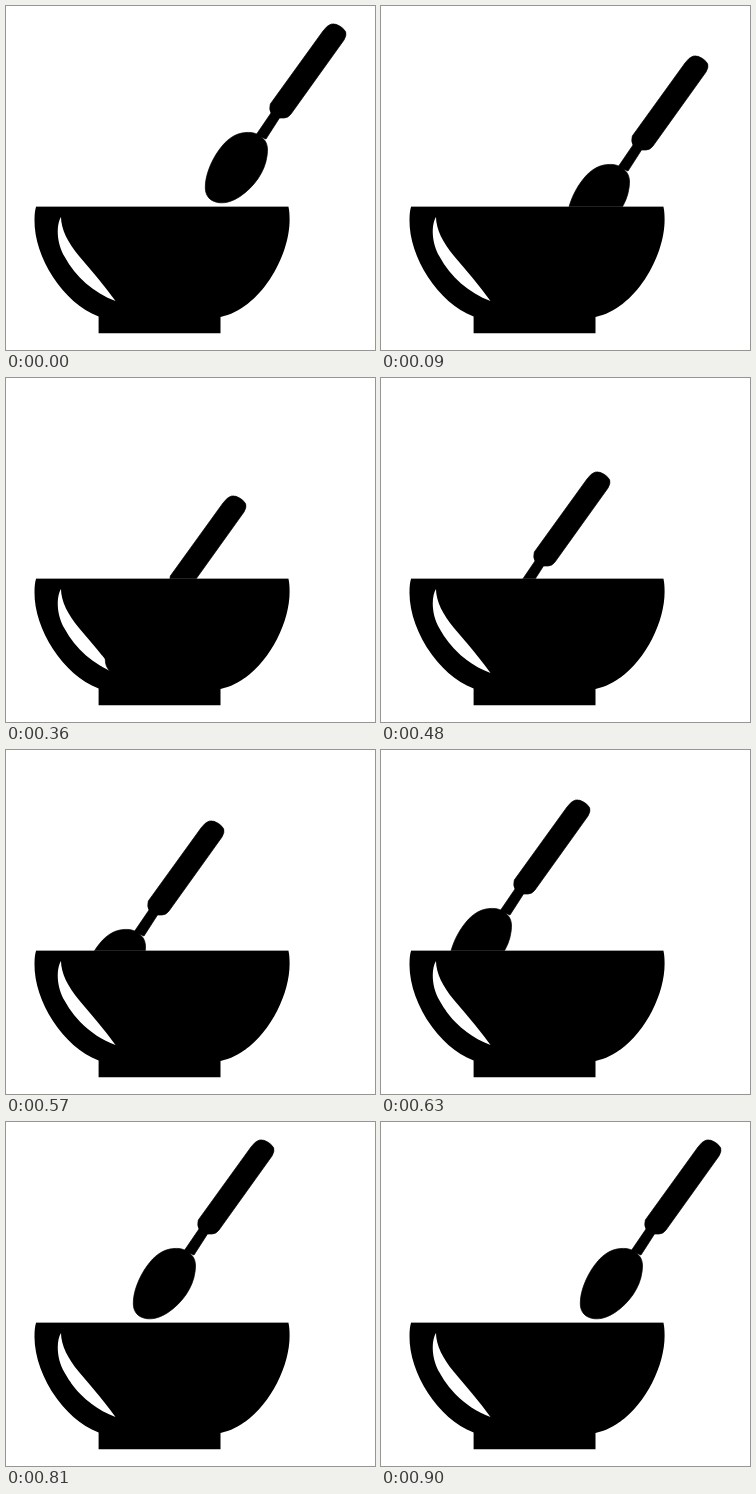
Write an HTML page that moves like this. It is 369 px wide and 344 px high and loops after 930 ms.

```html
<!DOCTYPE html>
<html lang="en">
<head>
<meta charset="utf-8">
<title>Stirring spoon</title>
<style>
html, body { margin: 0; width: 100%; height: 100%; overflow: hidden; background: #fff; }
svg { display: block; width: 369px; height: 344px; }
</style>
</head>
<body>
<svg viewBox="0 0 369 344">
  <path d="M30 201H282.5C283.4 205 283.6 209 283.6 214C283.6 251 254 303 214.500 311V327.200H92.600V310.500C57 297 28 251 28.5 214C28.5 208 29 204 30 201Z"/>
  <path fill="#fff" d="M55 211C50 219 50.500 237 58.500 250.500C69.500 271 88 287 109.5 295C98 279 85 264 73 250C62 237 55 223 55 211Z"/>
  <g id="spoon" stroke="#000" stroke-width=".7">
    <path d="M317 25L321 20.5Q325 16.8 330 18.3Q337 21 339.700 26Q340.800 29 338 34L285 108Q282 112 278 112H273.500L260 133L250 129L265 107Q263 104 264.300 98Z"/>
    <path d="M240 126.5C247 126 252 127.5 257 132.5C262 137 262 144 261 150C259 166 248 181 234 190.5C227 195 220 197.5 213 196.7C204 195.5 199.5 190 199.3 182C199 170 205 155 213 144C220 134 229 127 240 126.5Z"/>
  </g>
  <path stroke="#444" stroke-opacity=".5" d="M30 200.5H282.5"/>
</svg>
<script>
const STEP = 30, STEPS = 31, LEG = 6;
const stops = [[0, 0], [-26, 64], [-100, 100], [-117, 64], [-145, 0], [0, 0]];
const spoon = document.getElementById("spoon");

function offset(step) {
  const leg = Math.min(Math.floor(step / LEG), stops.length - 2);
  const k = step / LEG - leg;
  return stops[leg].map((v, i) => Math.round(v + (stops[leg + 1][i] - v) * k));
}

function draw(ms) {
  const step = Math.floor(ms / STEP) % STEPS;
  spoon.setAttribute("transform", `translate(${offset(step)})`);
}

const start = performance.now();
function tick() {
  draw(performance.now() - start);
  requestAnimationFrame(tick);
}
tick();
</script>
</body>
</html>
```
